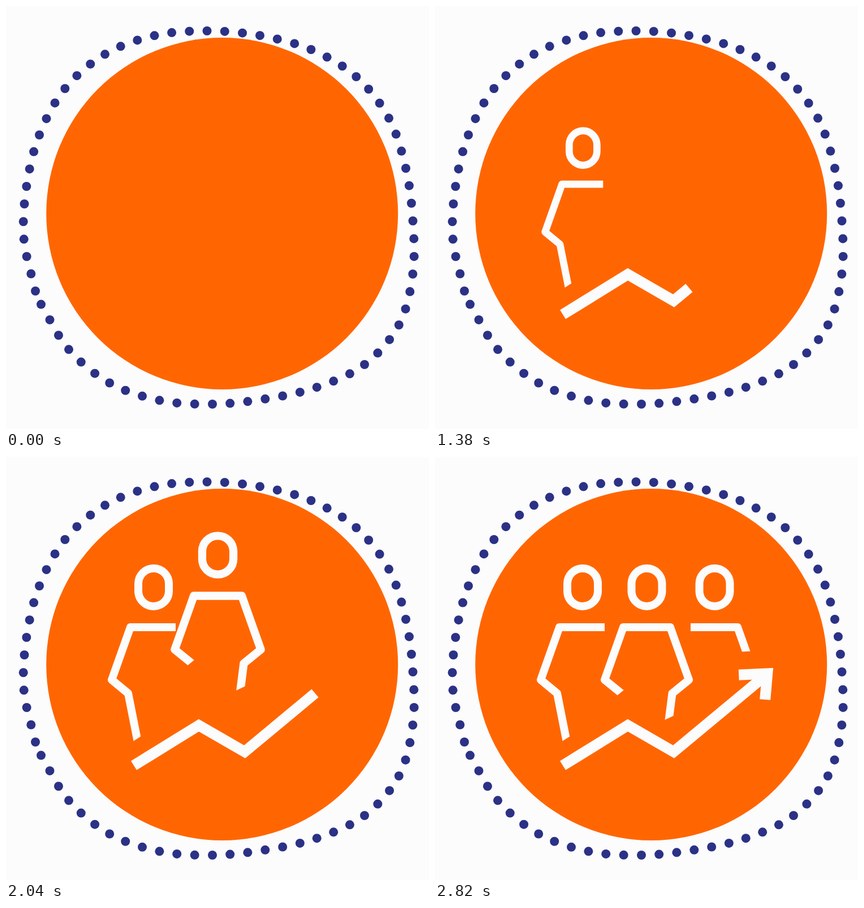
Recreate the animation shown at these times as an HTML page. Size 748 px wide and 748 px high, loop 3.6 s.

```html
<!DOCTYPE html>
<html lang="en">
<head>
<meta charset="utf-8">
<title>Team growth</title>
<style>
  html, body { margin: 0; width: 100%; height: 100%; overflow: hidden; background: #fcfcfc; }
  svg { display: block; width: 100vw; height: 100vh; }
  .ink { fill: none; stroke: #fcfcfc; stroke-width: 14; stroke-linejoin: round; }
  .arrow { fill: none; stroke: #fcfcfc; stroke-width: 19; stroke-miterlimit: 8; }
</style>
</head>
<body>
<svg viewBox="0 0 748 748">
  <g id="dots" fill="#2b3185"></g>
  <circle cx="382.2" cy="367" r="311" fill="#ff6602"/>
  <g id="people"></g>
  <path id="shaft" class="arrow" d="M226 545.5 341 474.5 422 521.3 583.5 387"/>
  <path id="head" class="arrow" d="M537.2 385.2 587.7 383 583.7 429"/>
</svg>
<script>
const LOOP = 3600, STEP = 30, PIVOT_Y = 346;
const byId = id => document.getElementById(id);

function add(parent, tag, attrs) {
  const node = document.createElementNS('http://www.w3.org/2000/svg', tag);
  for (const name in attrs) node.setAttribute(name, attrs[name]);
  return parent.appendChild(node);
}

// Smooth curve through keys of the form [position, a, b].
function spline(keys, at) {
  const last = keys.length - 1;
  at = Math.min(Math.max(at, keys[0][0]), keys[last][0]);
  let i = 0;
  while (i < last - 1 && at > keys[i + 1][0]) i++;
  const span = k => keys[k + 1][0] - keys[k][0];
  const slope = (k, c) => (keys[k + 1][c] - keys[k][c]) / span(k);
  const tangent = (k, c) => {
    if (k === 0) return slope(0, c);
    if (k === last) return slope(last - 1, c);
    const before = span(k - 1), after = span(k);
    return (slope(k - 1, c) * after + slope(k, c) * before) / (before + after);
  };
  const h = span(i), u = (at - keys[i][0]) / h, v = 1 - u;
  return [1, 2].map(c =>
    v * v * (1 + 2 * u) * keys[i][c] + u * v * v * h * tangent(i, c) +
    u * u * (3 - 2 * u) * keys[i + 1][c] - u * u * v * h * tangent(i + 1, c));
}

// Ring of dots: one key for every third dot.
const ring = [
  [52, 504], [31.7, 412.3], [36.3, 319], [59, 228], [104.3, 146], [175, 85.3],
  [262.5, 52.3], [355.5, 44], [449, 52.2], [539.4, 77], [619.3, 125], [677, 198.3],
  [707, 287], [719.5, 380], [719.3, 474], [694.8, 564], [634, 634], [549.7, 674.2],
  [458.3, 694.8], [365, 704], [271.4, 697.3], [183.2, 666.5], [111, 607.3], [62, 527.6]
].map(([x, y], k) => [3 * k, x, y]);

for (let n = 0; n < 70; n++) {
  const [cx, cy] = spline(ring, n);
  add(byId('dots'), 'circle', { cx, cy, r: 8 });
}

const people = [
  { start: 1060, pivot: 270, face: 261,
    body: 'M300 301H220L187 394 216 418 235 514',
    cut: '170,150 310,150 310,448 170,538' },
  { start: 1585, pivot: 374.5, face: 374.5,
    body: 'M342 428 300 394 333 301H416L449 394 419.5 418 412 477',
    cut: '280,280 470,280 470,435 390,472.5 350,399 280,456' },
  { start: 2130, pivot: 498.5, face: 494.5,
    body: 'M452 301H535L554 354.5',
    cut: '440,280 580,280 580,342 440,350.7' }
];

people.forEach((person, n) => {
  const clip = add(byId('people'), 'clipPath', { id: 'cut' + n });
  add(clip, 'polygon', { points: person.cut });
  person.group = add(byId('people'), 'g', { class: 'ink' });
  add(person.group, 'rect', { x: person.face - 27, y: 197, width: 54, height: 67, rx: 27 });
  add(person.group, 'path', { d: person.body, 'clip-path': `url(#cut${n})` });
});

// [ms since start, scale, vertical offset]
const rise = [
  [0, 0, 348], [50, 0.16, 335], [120, 0.485, 235], [275, 0.865, 35], [320, 0.908, 10],
  [360, 0.948, -11], [470, 1.03, -57], [570, 1.07, -36], [650, 1.01, -3], [690, 1, 0]
];

function trim(path, length) {
  path.style.visibility = length > 0 ? 'visible' : 'hidden';
  path.setAttribute('stroke-dasharray', `${Math.max(length, 0)} 2000`);
}

function render(t) {
  trim(byId('shaft'), t * 0.1915);
  trim(byId('head'), (t - 2160) * 0.189);
  for (const { group, start, pivot } of people) {
    const [scale, dy] = spline(rise, t - start);
    group.style.visibility = t > start ? 'visible' : 'hidden';
    group.setAttribute('transform',
      `translate(${pivot} ${PIVOT_Y + dy}) scale(${scale}) translate(${-pivot} ${-PIVOT_Y})`);
  }
}

const begin = performance.now();
function tick() {
  const t = (performance.now() - begin) % LOOP;
  render(Math.floor(t / STEP) * STEP);
  requestAnimationFrame(tick);
}
tick();
</script>
</body>
</html>
```
